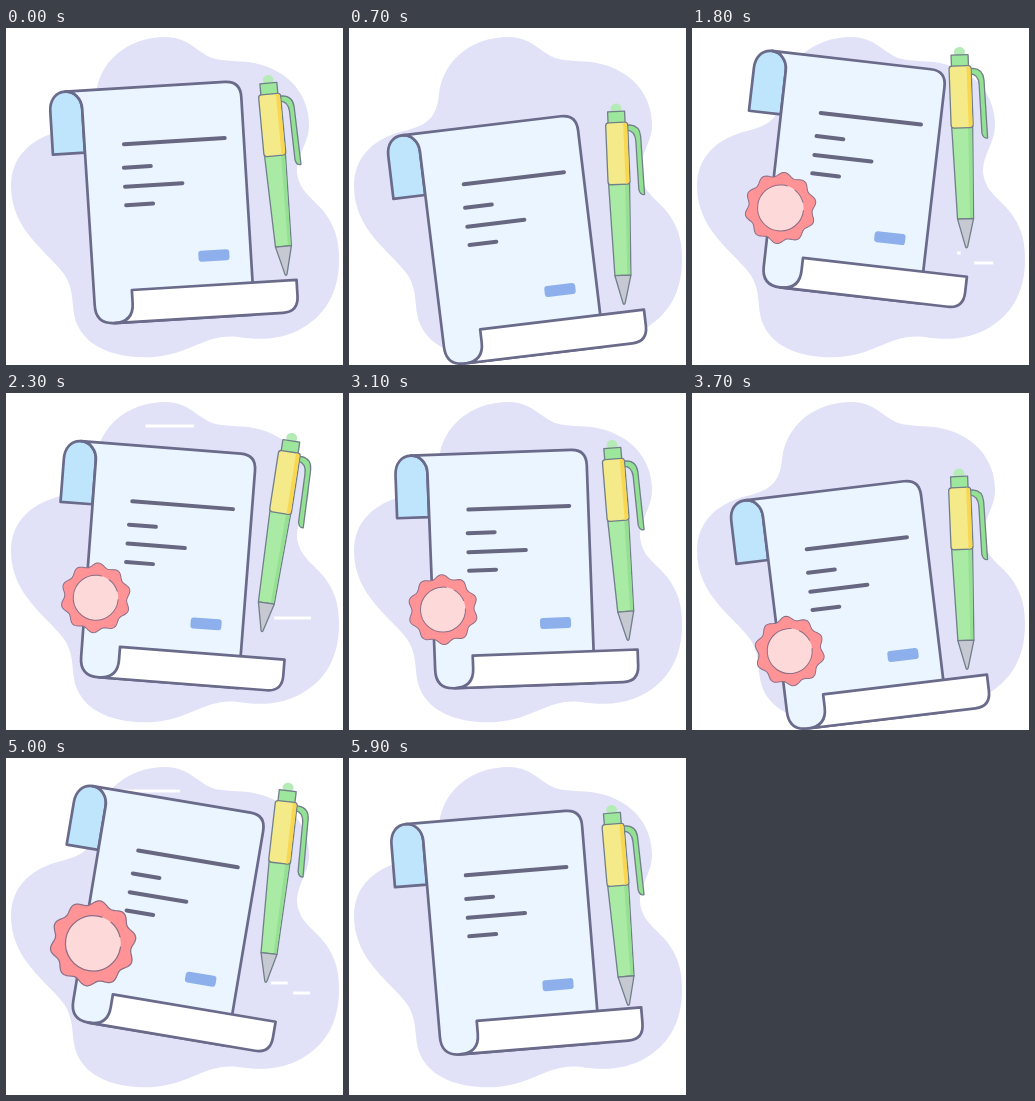
An HTML page for the animation above (6 s loop, 337x337 px).

```html
<!DOCTYPE html>
<html lang="en">
<head>
<meta charset="utf-8">
<title>Sealed document</title>
<style>
html, body { margin: 0; width: 100%; height: 100%; overflow: hidden; background: #fff; }
svg { display: block; width: 100%; height: 100%; }
</style>
</head>
<body>
<svg viewBox="0 0 337 337">
  <path fill="#e1e1f8" d="M160 9C182 9 191 24 206 30C222 35 237 31 256 37C285 46 303 68 303 97C303 115 291 126 291 144C293 166 311 172 321 188C331 203 333 216 333 232C333 265 319 289 291 303C272 312 252 312 232 309C200 305 185 326 148 329C115 331 82 322 71 296C64 278 70 264 58 246C42 224 5 202 5 158C5 128 26 110 55 103C80 97 88 88 90 66C93 35 120 9 160 9Z"/>
  <g id="streaks" stroke="#fff" stroke-width="3"></g>

  <g id="pen" stroke="#707f88" stroke-width="1.3" stroke-linejoin="round">
    <ellipse cy="-97" rx="5.5" ry="5" fill="#b5ebb6" stroke="none"/>
    <path fill="#9de79c" d="M-8.5-94H8.5V-82H-8.5Z"/>
    <path fill="#93e294" d="M10-80H13Q23-79 23.5-68L25-10Q21-9 19.5-15L18.5-64Q18-74 10-75Z"/>
    <path fill="#a9eba5" d="M-10.5-23H10.5L8 70H-8Z"/>
    <path fill="#95e093" stroke="none" d="M6-22H9.9L7.4 69.4H4.5Z"/>
    <path fill="#c6c8d2" d="M-8 70H8L1 98Q0 100-1 98Z"/>
    <rect x="-11" y="-83" width="22" height="62" rx="3" fill="#f5ea8a"/>
    <path fill="#f9d750" stroke="none" d="M6.5-82.4H8Q10.4-82 10.4-80V-24Q10.4-22 8-21.6H6.5Z"/>
  </g>

  <g id="paper" stroke="#6a6a8a" stroke-width="2.7" stroke-linejoin="round" stroke-linecap="round">
    <path fill="#bfe5fc" d="M-122-54V-97C-122-108-116-116-106-116C-97-116-90-108-90-98V-54Z"/>
    <path fill="#eaf5ff" d="M-106-116H54Q69.5-116 69.5-100V118H-71Q-89.5 118-89.5 99L-90-98C-90-108-97-116-106-116Z"/>
    <path fill="#fff" d="M-51.5 86H113.5V102Q113.5 118 98 118H-71Q-51.5 118-51.5 99Z"/>
    <path stroke="#686782" stroke-width="4" d="M-50.5-60H50.5M-52-36.5H-25M-52-17.5H5.5M-52 1H-25"/>
    <rect x="17" y="51" width="31" height="11" rx="3" fill="#8db0ec" stroke="none"/>
    <g id="seal" stroke="#8d6f86" stroke-width="1">
      <path id="rim" fill="#ff9396"/>
      <circle r="22.5" fill="#fdd9d9" stroke="none"/>
      <circle r="22.5" fill="none" pathLength="100" stroke-dasharray="78 6 10 6"/>
    </g>
  </g>
</svg>
<script>
const el = id => document.getElementById(id);
const LOOP = 6000, SWING = 3000, PEN_LAG = 200;

// Turning points as [ms, value], eased in between
const tilt = [[300, -.6], [1190, -15.4], [1980, 9.6], [2780, -5.3], [3300, -.6]];
const lift = [[0, 0], [730, 37], [1560, -28], [2400, 0], [3000, 0]];
const pop = [[1000, 0], [1450, 1.2], [1900, 1], [4600, 1], [5000, 1.23], [5350, 0]];

// White streaks: y, left, right, start
const streaks = [
  [43, 98, 150, 850],
  [303, 100, 178, 520],
  [33, 110, 188, 1350],
  [225, 265, 313, 1640],
  [235, 280, 304, 1100]
];
const STREAK_MS = 900, TAIL_LAG = 300;

const clamp = p => Math.min(1, Math.max(0, p));
const smooth = p => (1 - Math.cos(Math.PI * clamp(p))) / 2;
const cubicIn = p => clamp(p) ** 3;
const mod = (a, n) => (a % n + n) % n;

function keyed(keys, t) {
  let [t0, v] = keys[0];
  for (const [t1, v1] of keys.slice(1)) {
    if (t < t1) return v + (v1 - v) * smooth((t - t0) / (t1 - t0));
    [t0, v] = [t1, v1];
  }
  return v;
}

function cyclic(keys, t) {
  const first = keys[0][0];
  return keyed(keys, first + mod(t - first, SWING));
}

function scallop(r, depth, petals) {
  const points = Array.from({ length: 120 }, (_, i) => {
    const a = i / 60 * Math.PI, q = r - depth * Math.cos(petals * a);
    return `${(q * Math.cos(a)).toFixed(2)} ${(q * Math.sin(a)).toFixed(2)}`;
  });
  return "M" + points.join("L") + "Z";
}

el("rim").setAttribute("d", scallop(33, 2, 10));

const lines = streaks.map(([y]) => {
  const line = document.createElementNS("http://www.w3.org/2000/svg", "line");
  line.setAttribute("y1", y);
  line.setAttribute("y2", y);
  return el("streaks").appendChild(line);
});

function place(id, x, y, t) {
  el(id).setAttribute("transform", `translate(${x} ${y + cyclic(lift, t)}) rotate(${cyclic(tilt, t)})`);
}

function draw(time) {
  const t = time % LOOP;
  place("paper", 172, 173, t);
  place("pen", 271, 148.7, t - PEN_LAG);

  const k = keyed(pop, t);
  el("seal").setAttribute("transform", `translate(-79.5 39) scale(${k})`);
  el("seal").setAttribute("visibility", k > 0 ? "visible" : "hidden");

  streaks.forEach(([, left, right, start], i) => {
    const p = (t % SWING - start) / STREAK_MS;
    lines[i].setAttribute("x1", left + (right - left) * cubicIn(p - TAIL_LAG / STREAK_MS));
    lines[i].setAttribute("x2", left + (right - left) * Math.max(smooth(p), cubicIn(p)));
  });
}

const begin = performance.now();
function tick() {
  draw(performance.now() - begin);
  requestAnimationFrame(tick);
}
tick();
</script>
</body>
</html>
```
